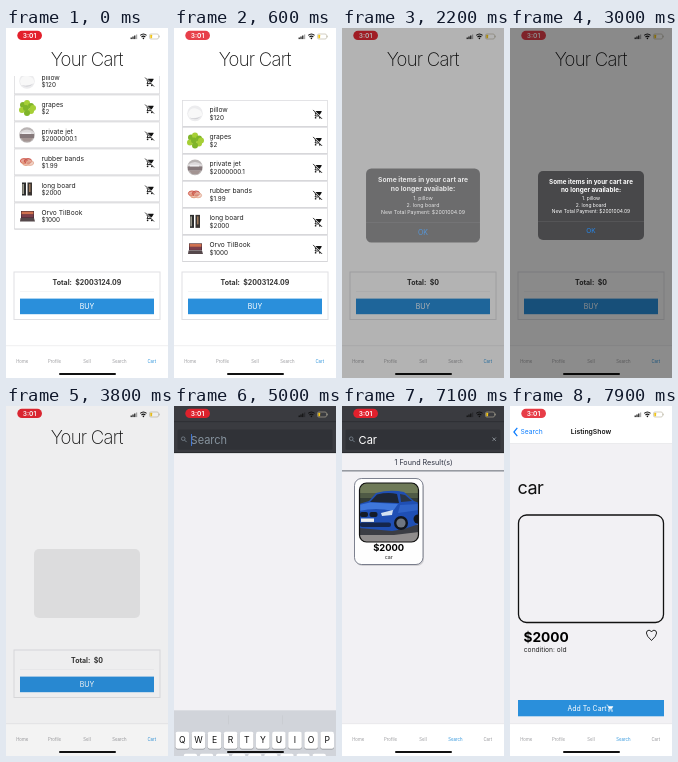
Write an HTML page that moves like this. It is 162 px wide and 350 px high and loops after 8000 ms.

```html
<!DOCTYPE html>
<html lang="en">
<head>
<meta charset="utf-8">
<title>Shopping app</title>
<style>
html, body { margin: 0; width: 100%; height: 100%; overflow: hidden; background: #fff; }
svg { display: block; width: 100vw; height: 100vh; }
text { font-family: Inter, Roboto, sans-serif; white-space: pre; }
</style>
</head>
<body>
<svg id="stage" viewBox="0 0 162 350" xmlns="http://www.w3.org/2000/svg"></svg>
<script>
const LOOP = 8000, BLUE = '#2a8fdb', LINK = '#0a7cff', TAB = '#2f95dc', PAGE = '#f2f1f4', HEADER = '#3a3b40';

const clamp = v => Math.max(0, Math.min(1, v));
const ramp = (t, a, b) => clamp((t - a) / (b - a));
const smooth = p => p * p * (3 - 2 * p);
const easeOut = p => 1 - (1 - p) ** 3;
const between = (t, a, b) => t >= a && t < b;

const rect = (x, y, w, h, fill, more = '') =>
  `<rect x="${x}" y="${y}" width="${w}" height="${h}" fill="${fill}" ${more}/>`;
const text = (x, y, size, str, fill = '#222', more = '') =>
  `<text x="${x}" y="${y}" font-size="${size}" fill="${fill}" ${more}>${str}</text>`;
const centered = (x, y, size, str, fill, more = '') =>
  text(x, y, size, str, fill, `text-anchor="middle" ${more}`);
const line = (d, color, width, more = '') =>
  `<path d="${d}" fill="none" stroke="${color}" stroke-width="${width}" ${more}/>`;
const shape = (d, fill) => `<path d="${d}" fill="${fill}"/>`;
const dot = (x, y, r, fill) => `<circle cx="${x}" cy="${y}" r="${r}" fill="${fill}"/>`;
const group = (id, body, more = '') => `<g id="${id}" ${more}>${body}</g>`;

const cart = (x, y, color) => `<g transform="translate(${x} ${y})">
  ${shape('M-2.6-2.5H4.4L2.6 1H-1.2Z', color)}
  ${line('M-4.6-4H-3.2L-1.1.8-2 2.4H3.4', color, 0.9)}
  ${dot(-1.4, 4, 0.95, color)}${dot(2.7, 4, 0.95, color)}</g>`;
// Cart with a slash, drawn on a 24 unit grid
const cartOff = (x, y) => `<g transform="translate(${x} ${y}) scale(.42) translate(-12 -12)">
  ${shape('M6.5 4H20.5Q22 4 21.5 5.5L17.3 12Q16.7 13 15.5 13Z', '#111')}
  ${line('M5.5 8 7.8 11.6 5.6 15.8H15', '#111', 2.2)}
  ${dot(7, 20, 2, '#111')}${dot(17, 20, 2, '#111')}
  ${line('M1 1.4 22.4 22.8', '#111', 2)}</g>`;

const thumbs = [
  dot(21, 13, 7.8, '#ececee') + shape('M14 13q2-6 8-5 7 2 6 7-7 4-13 2Z', '#f8f8f8')
    + shape('M15 17q6 2 12-1-5 5-12 1Z', '#d2d2d6'),
  [[17, 10], [21, 8], [25, 11], [16, 15], [20, 13], [25, 16], [21, 18], [27, 13]]
    .map(([x, y], i) => dot(x, y, 3, i % 2 ? '#a6cf36' : '#7fb42a')).join(''),
  dot(21, 13, 7.8, '#b9b4b4') + shape('M14 10q7-5 14 0v3H14Z', '#dcd9da')
    + rect(14, 12, 14, 4, '#85787a') + shape('M15 16h12l-3 3.5h-6Z', '#a39492') + rect(16, 10.5, 9, 1.5, '#f0eef0'),
  ['#d4604e', '#e29a7c', '#c9544a', '#e6b09a'].map((c, i) =>
    `<ellipse cx="${18 + i * 2}" cy="${12 + i % 2 * 2}" rx="3.6" ry="2.4" fill="${c}" fill-opacity=".55" stroke="${c}"/>`).join(''),
  rect(16, 6.5, 4, 13, '#2b2c2d') + rect(21.5, 6.5, 4.5, 13, '#3a3532')
    + rect(16.5, 8, 1.3, 10, '#b9b7a8') + rect(23, 8, 1.5, 8, '#9d7a5c'),
  rect(15, 8, 13, 7, '#3a2731') + rect(15.5, 8.5, 12, 3, '#d07150')
    + rect(15.5, 11.5, 12, 3, '#7b3f4c') + shape('M14.5 15h13.5l1 3.5H14Z', '#55484b'),
];
const items = [['pillow', '$120'], ['grapes', '$2'], ['private jet', '$2000000.1'],
  ['rubber bands', '$1.99'], ['long board', '$2000'], ['Orvo TilBook', '$1000']];
const row = ([name, price], i) => `<g transform="translate(0 ${52 + i * 27})">
  ${rect(8.5, 0, 145, 26, '#fff', 'stroke="#dcdcdf" stroke-width=".8"')}
  ${rect(8.5, 25.6, 145, 1, '#d6d6d9')}${thumbs[i]}
  ${text(35.5, 11.6, 6.7, name)}${text(35.5, 19.2, 6.3, price)}${cartOff(143.7, 14)}</g>`;

const cartPage = rect(0, 0, 162, 350, '#fff', 'id="cartBack"')
  + centered(80.7, 38, 18.5, 'Your Cart', '#111', 'font-weight="200" letter-spacing="-.75"')
  + `<g clip-path="url(#listClip)">${group('list', items.map(row).join(''))}</g>`
  + rect(8, 244, 146, 47.5, 'none', 'stroke="#e0e0e3" stroke-width="1"')
  + centered(81, 257, 7, '', '#333', 'id="total" font-weight="700"')
  + rect(14, 263.5, 134, 0.4, '#e6e6e8')
  + group('buy', rect(14, 270.6, 134, 15.6, BLUE) + centered(81, 280.9, 7, 'BUY', '#fff'));

const alertBox = rect(28, 143, 106, 69, '#48484a', 'rx="5" id="alertBack"')
  + group('alertText',
    centered(81, 156, 6.3, 'Some items in your cart are', '#fff', 'font-weight="700"')
    + centered(81, 164.3, 6.3, 'no longer available:', '#fff', 'font-weight="700"')
    + centered(81, 172, 4.9, '1. pillow', '#fff') + centered(81, 178.5, 4.9, '2. long board', '#fff')
    + centered(81, 185, 4.9, 'New Total Payment: $2001004.09', '#fff')
    + rect(28, 193, 106, 0.4, '#68686b')
    + rect(28, 193.4, 106, 18.6, '#77777a', 'id="okPress" rx="3"')
    + centered(81, 205, 6.5, 'OK', '#2686e8'));

const car = rect(17.5, 77, 59, 59, '#4f5a45')
  + rect(17.5, 77, 59, 10, '#6f7a58') + rect(17.5, 92, 59, 14, '#343d36')
  + rect(17.5, 117, 59, 19, '#8f8c8c')
  + shape('M17 119H77V126L52 129H17Z', '#3b3d44')
  + shape('M17 98 27 95 34 87Q48 83 62 86L72 95 77 97V118L62 123 50 125 17 122Z', '#1f4fb4')
  + shape('M28 96 35 88.5Q46 86 55 88L57 97Z', '#1d2636') + shape('M59 96 58 88 63 89 70 95Z', '#2a3546')
  + shape('M17 99 28 96.5 56 98 51 105Q34 101 17 105Z', '#3f77dc')
  + shape('M58 99 77 98V104L56 107Z', '#2f63c8')
  + rect(18, 106, 8, 5, '#141b28', 'rx="2"') + rect(27.5, 106, 8, 5, '#141b28', 'rx="2"')
  + shape('M39 107 51 104 50 109 40 110Z', '#d5e3f3')
  + rect(18, 116.5, 31, 4.5, '#15264c', 'rx="2"') + rect(19, 112.5, 13, 3.4, '#eef0f0')
  + dot(59, 117, 7, '#12161d') + dot(59, 117, 4.6, '#6f7681') + dot(76, 113, 4.5, '#12161d');

const results = rect(0, 64.5, 162, 0.8, '#3e4450')
  + centered(81.5, 58.8, 7.2, '1 Found Result(s)', '#2c3140')
  + rect(13.5, 74, 68.5, 86, '#000', 'rx="7" opacity=".13"')
  + group('card', rect(12.5, 72.5, 68.5, 86, '#fff', 'rx="7" stroke="#5d6274" stroke-width=".8"')
    + `<g clip-path="url(#carClip)">${car}</g>`
    + rect(17.5, 77, 59, 59, 'none', 'rx="7" stroke="#111" stroke-width="1.2"')
    + centered(46.7, 145.2, 9.4, '$2000', '#000', 'font-weight="700"')
    + centered(46.7, 152.9, 5.3, 'car'));

const searchPage = rect(0, 0, 162, 350, PAGE) + rect(0, 0, 162, 47, HEADER)
  + rect(0, 15.5, 162, 0.6, '#24262a') + rect(0, 46.5, 162, 0.6, '#1c1e20')
  + rect(3.5, 23.5, 155, 20.3, '#303237', 'rx="1.3"')
  + `<circle cx="9.2" cy="32.7" r="1.8" fill="none" stroke="#86939e" stroke-width=".7"/>`
  + line('M10.6 34.1l2 2', '#86939e', 0.8)
  + text(16.6, 37.5, 11, '', '#fff', 'id="query"')
  + rect(17, 28, 0.8, 12, '#3f83f7', 'id="caret"')
  + group('clear', line('M150.5 31.5l3.4 3.4m0-3.4l-3.4 3.4', '#a5adb4', 0.7))
  + group('results', results);

const heart = line('M141.5 234.5Q136.4 230 136.4 227 136.6 224.3 139 224.2 140.7 224.3 141.5 226 142.3 224.3 144 224.2 146.5 224.3 146.6 227 146.6 230 141.5 234.5Z', '#111', 0.9);
const listing = rect(0, 0, 162, 318, PAGE) + rect(0, 0, 162, 37.8, '#fff') + rect(0, 37.6, 162, 0.4, '#d0d0d3')
  + line('M7.3 21.8 3.9 26 7.3 30.2', LINK, 1.2)
  + text(10.5, 28.4, 6.7, 'Search', LINK)
  + centered(81, 28.4, 6.8, 'ListingShow', '#111', 'font-weight="600"')
  + text(7.5, 88, 18, 'car', '#111', 'letter-spacing="-.5"')
  + rect(8.5, 109, 145, 107.5, PAGE, 'rx="8" stroke="#111" stroke-width="1.3"')
  + text(13.5, 235.8, 13.7, '$2000', '#000', 'font-weight="700"')
  + text(13.8, 246, 6.7, 'condition: old') + heart
  + rect(8, 294, 146, 16.3, BLUE)
  + centered(77, 304.8, 6.9, 'Add To Cart', '#fff')
  + `<g transform="translate(100 302) scale(.75)">${cart(0, 0, '#fff')}</g>`;

const key = (x, y, w, fill, label = '', size = 8.6, color = '#111', cls = '') =>
  rect(x, y + 0.7, w, 17, '#8b8d92', 'rx="2"') + rect(x, y, w, 17, fill, 'rx="2"')
  + centered(x + w / 2, y + (size > 7 ? 11.2 : 10.8), size, label, color, cls);
const letterRow = (letters, x, y) => [...letters].map((c, i) =>
  key(x + i * 16.1, y, 13.6, '#fff', c, 8.6, '#111', 'class="letter"')).join('');
const GREY = '#abb0ba';
const keyboard = rect(0, 214, 162, 136, '#d1d4da')
  + rect(54, 219, 0.4, 9, '#bfc2c8') + rect(108, 219, 0.4, 9, '#bfc2c8')
  + letterRow('qwertyuiop', 1.5, 235.5) + letterRow('asdfghjkl', 9.6, 257.5) + letterRow('zxcvbnm', 25.7, 279.5)
  + key(1.5, 279.5, 17.5, GREY) + line('M10.2 284l-4 4.3h2v3.5h4v-3.5h2Z', '#111', 0.7)
  + key(143, 279.5, 17.5, GREY) + line('M146.5 288l3-3.4h7v6.8h-7ZM151.2 286.3l3.4 3.4m0-3.4l-3.4 3.4', '#111', 0.7)
  + key(1.5, 301.5, 17.5, GREY, '123', 6) + key(22, 301.5, 17.5, GREY)
  + '<circle cx="30.7" cy="310" r="3.7" fill="none" stroke="#111" stroke-width=".7"/>'
  + dot(29.4, 309, 0.5, '#111') + dot(32, 309, 0.5, '#111') + line('M28.5 311q2.2 2.6 4.4 0', '#111', 0.7)
  + key(42, 301.5, 78, '#fff', 'space', 6.3) + key(122.7, 301.5, 37.8, '#0a7cff', 'search', 6.3, '#fff')
  + line('M11 334.5h10M16 329.5v10M12.2 331.5h7.6M12.2 337.5h7.6', '#555a62', 0.6)
  + '<g fill="none" stroke="#555a62" stroke-width=".7"><circle cx="16" cy="334.5" r="5"/><ellipse cx="16" cy="334.5" rx="2.4" ry="5"/>'
  + '<rect x="144.4" y="328.5" width="3.4" height="7" rx="1.7"/><path d="M142.6 333q0 4.3 3.5 4.3t3.5-4.3M146.1 337.3v3m-2 0h4"/></g>';

const tabs = ['Home', 'Profile', 'Sell', 'Search', 'Cart'];
const tabBar = rect(0, 318, 162, 32, '#fff', 'id="tabBack"') + rect(0, 317.6, 162, 0.5, '#dedee0')
  + tabs.map((name, i) => centered(16.2 + i * 32.4, 335, 4.3, name, '#98989c', 'class="tab"')).join('');

const status = group('pill', rect(11.3, 2.8, 24.7, 9.2, '#e3202c', 'rx="4.6"'))
  + centered(23.5, 9.8, 6.6, '3:01', '#fff', 'font-weight="600"')
  + [0, 1, 2, 3].map(i => rect(124.6 + i * 1.8, 9.5 - i, 1.2, 1.6 + i, '#111', i > 2 ? 'opacity=".35"' : '')).join('')
  + line('M134.3 7.4q3.1-2.8 6.2 0M135.5 9q1.9-1.7 3.8 0', '#111', 1.1) + dot(137.4, 10.4, 0.8, '#111')
  + rect(143.5, 6, 9, 5, 'none', 'rx="1.4" stroke="#b5b19c" stroke-width=".6"')
  + rect(144.3, 6.8, 1.8, 3.4, '#f0c419', 'rx=".5"') + rect(153.1, 7.6, 0.6, 1.8, '#b5b19c');

document.getElementById('stage').innerHTML =
  `<defs><clipPath id="listClip">${rect(0, 48, 162, 192, '#000')}</clipPath>
   <clipPath id="carClip">${rect(17.5, 77, 59, 59, '#000', 'rx="7"')}</clipPath></defs>`
  + group('cartPage', cartPage) + group('searchPage', searchPage) + group('listing', listing)
  + group('tabBar', tabBar) + group('keyboard', keyboard) + group('status', status)
  + rect(53, 345, 57, 2, '#111', 'rx="1"')
  + rect(0, 0, 162, 350, '#000', 'id="dim"') + group('alert', alertBox);

const $ = id => document.getElementById(id);
const show = (id, on) => $(id).setAttribute('display', on ? 'inline' : 'none');
const fade = (id, v) => $(id).setAttribute('opacity', v.toFixed(3));
const move = (id, x, y) => $(id).setAttribute('transform', `translate(${x.toFixed(2)} ${y.toFixed(2)})`);
const letters = document.querySelectorAll('.letter'), tabLabels = document.querySelectorAll('.tab');
const letterNames = [...letters].map(el => el.textContent);

function render(t) {
  const searching = t >= 4200, emptied = t >= 1800;
  fade('pill', 0.93 + 0.07 * Math.cos(t * Math.PI / 600));

  // Cart list, purchase and alert
  show('cartPage', !searching);
  show('list', !emptied);
  move('list', 0, -12 + 37 * smooth(ramp(t, 0, 450)) - 25 * smooth(ramp(t, 450, 1000)));
  $('total').textContent = emptied ? 'Total:  $0' : 'Total:  $2003124.09';
  fade('buy', 1 - 0.7 * (ramp(t, 1200, 1300) - ramp(t, 1350, 1600)));
  $('cartBack').setAttribute('fill', t >= 3000 ? '#fafafb' : '#fff');
  const shown = easeOut(ramp(t, 2050, 2550));
  const left = 1 - smooth(ramp(t, 3000, 4000));
  const grow = 1 + 0.22 * (1 - shown);
  fade('dim', 0.45 * shown * left);
  fade('alert', shown * left);
  fade('alertText', clamp(left * 1.5 - 0.5));
  $('alert').setAttribute('transform', `translate(81 177.5) scale(${grow}) translate(-81 -177.5)`);
  show('okPress', between(t, 2700, 3000));

  // Search, typing and results
  const typed = 'Car'.slice(0, (t >= 5700) + (t >= 6000) + (t >= 6200));
  show('searchPage', searching);
  $('query').textContent = typed || 'Search';
  $('query').setAttribute('fill', typed ? '#fff' : '#86939e');
  show('clear', typed);
  show('caret', between(t, 5000, 6500));
  $('caret').setAttribute('x', 17 + [0, 8.2, 14.6, 18.8][typed.length]);
  show('results', t >= 6500);
  fade('card', 1 - 0.3 * (ramp(t, 7100, 7200) - ramp(t, 7250, 7450)));
  show('keyboard', between(t, 5000, 6800));
  move('keyboard', 0, 136 * (1 - easeOut(ramp(t, 4950, 5350)) + smooth(ramp(t, 6400, 6700))));
  letters.forEach((el, i) => {
    el.textContent = typed ? letterNames[i] : letterNames[i].toUpperCase();
  });
  tabLabels.forEach((el, i) => el.setAttribute('fill', i === (searching ? 3 : 4) ? TAB : '#98989c'));

  // Push to the listing
  const push = easeOut(ramp(t, 7150, 7750));
  show('listing', t > 7150);
  move('listing', 162 * (1 - push), 0);
  move('searchPage', -48 * push, 0);
}

function tick(now) {
  render(now % LOOP);
  requestAnimationFrame(tick);
}
render(0);
requestAnimationFrame(tick);
</script>
</body>
</html>
```
